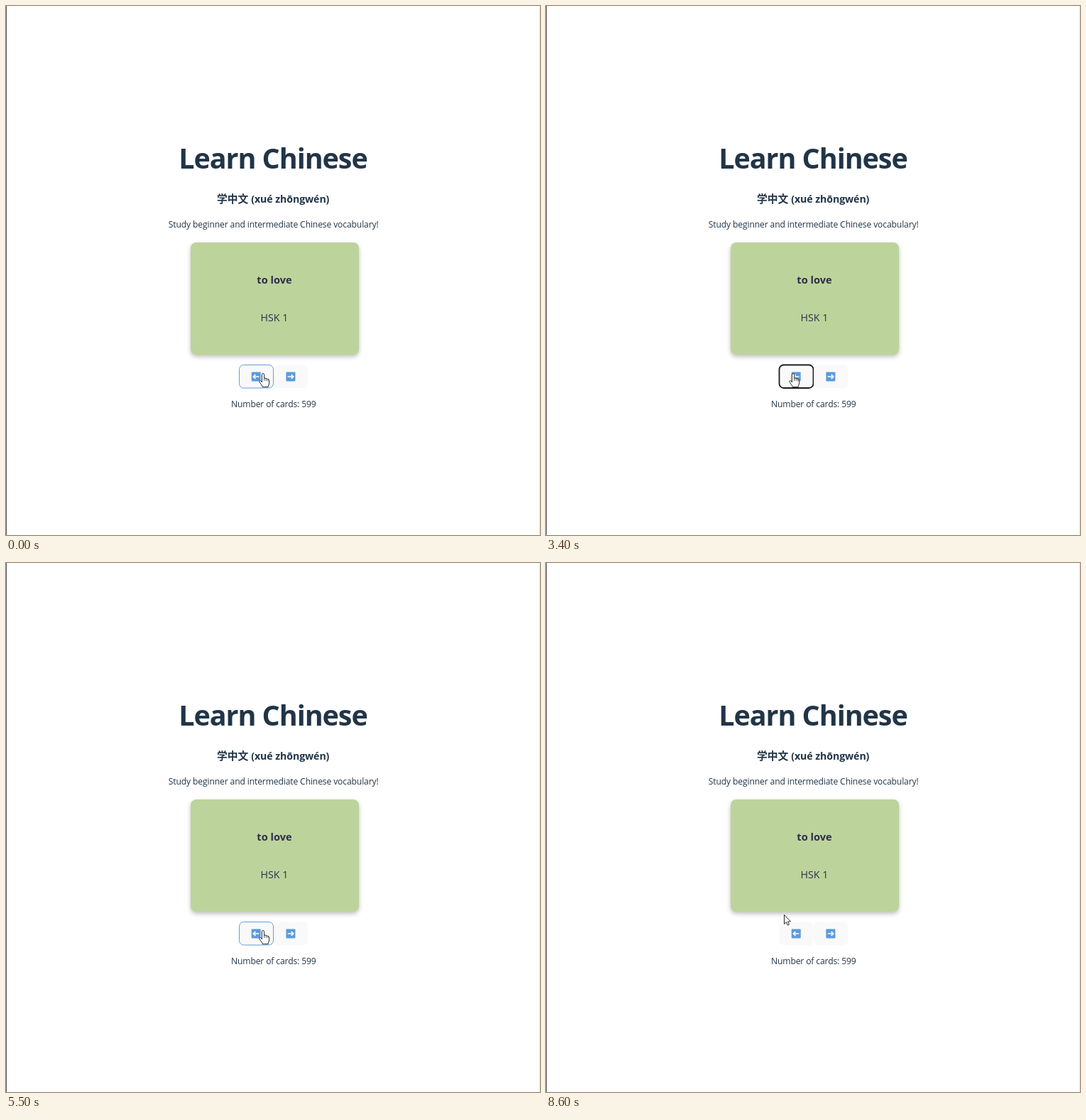
Recreate the animation shown at these times as an HTML page. Size 752 by 745 pixels, loop 8700 ms.

```html
<!DOCTYPE html>
<html lang="en">
<head>
<meta charset="utf-8">
<title>Learn Chinese</title>
<style>
html, body { margin: 0; width: 100%; height: 100%; overflow: hidden; background: #fff; }
body { position: relative; }
svg { position: absolute; left: 0; top: 0; display: block; overflow: visible; }
text { font-family: "Open Sans", "Noto Sans", sans-serif; fill: #213547; text-anchor: middle; }
.zh { font-family: "Noto Sans CJK SC", "Noto Sans CJK JP", "Noto Sans CJK", sans-serif; font-weight: 700; font-size: 14.8px; letter-spacing: 0; }
.small { font-size: 12.1px; letter-spacing: -.12px; }
#card { position: absolute; left: 259.5px; top: 333px; width: 237px; height: 158px; border-radius: 8px; box-shadow: 0 3px 6px rgba(0, 0, 0, .26); }
#card text { fill: #312d4b; }
</style>
</head>
<body>
<svg width="752" height="745" viewBox="0 0 752 745">
  <rect width="1" height="745" fill="#555"/>
  <rect x="751" width="1" height="745" fill="#e6e6e6"/>
  <text x="376" y="229.3" font-size="39.5" font-weight="700" letter-spacing="-1.05">Learn Chinese</text>
  <text x="297" y="277.3" style="text-anchor:start" class="zh" lang="zh-CN">学中文</text>
  <text x="345.3" y="277.3" style="text-anchor:start" font-size="14.2" font-weight="700" letter-spacing="-.1">(xué zhōngwén)</text>
  <text x="376.7" y="312.3" class="small">Study beginner and intermediate Chinese vocabulary!</text>
  <g id="buttons"></g>
  <text x="376.8" y="564.8" class="small">Number of cards: 599</text>
</svg>
<div id="card">
  <svg width="237" height="158" viewBox="0 0 237 158">
    <g id="front">
      <text id="word" x="118" y="58.3" font-size="14.6" font-weight="700"></text>
      <text id="level" x="118" y="111.3" font-size="14.2"></text>
    </g>
    <text id="back" x="118" y="85.2" font-size="14.4"><tspan id="hanzi" class="zh" lang="zh-CN"></tspan><tspan id="pinyin"></tspan></text>
  </svg>
</div>
<svg width="752" height="745" viewBox="0 0 752 745">
  <g id="hand" stroke="#2a2a2a" stroke-width="1" stroke-linejoin="round" stroke-linecap="round">
    <path fill="#fff" d="M-1.6 11.5V1.2a1.6 1.6 0 0 1 3.2 0V6.2q1.6-.6 2.7.6q1.5-.5 2.5.8q1.7-.1 1.8 1.8V13q0 2-1.4 4v1.6H-.9v-1.2Q-2.8 15.2-4.9 11.4c-.8-1.6.9-2.6 2-1.5z"/>
    <path fill="none" stroke-width=".8" d="M1.6 6.2V9.6M4.3 6.8V9.8M6.8 7.6V10"/>
  </g>
  <path id="arrow" fill="#fff" stroke="#2a2a2a" stroke-width="1" stroke-linejoin="round" d="M.5 .5V13.4L3.4 10.7L5.3 15.1L7.4 14.2L5.5 9.9H9.5Z"/>
</svg>
<script>
const LOOP = 8700, FLIP = 150, PRESS = 130;
const $ = id => document.getElementById(id);

const CARDS = {
  love: ['to love', 'HSK 1', '爱', 'ài', '#bcd49b'],
  eight: ['eight', 'HSK 1', '八', 'bā', '#bcd49b'],
  effect: ['effect', 'HSK 3', '作用', 'zuò yòng', '#f5c876']
};

// pointer tip: time, x, y
const PATH = [
  [0, 362, 518], [80, 362, 518], [350, 401, 521], [650, 401, 521],
  [1000, 372, 437], [1400, 371, 435], [2100, 371, 435], [2500, 350, 519],
  [3400, 348, 518], [3580, 348, 518], [3850, 373, 430], [4200, 373, 428],
  [4620, 373, 428], [4900, 402, 521], [5150, 402, 521], [5450, 362, 518],
  [5550, 362, 518], [5800, 401, 520], [6050, 401, 520], [6350, 372, 438],
  [6900, 372, 436], [7120, 372, 436], [7450, 344, 526], [8050, 344, 526],
  [8500, 335, 495], [LOOP, 335, 495]
];

// button release: time, button index, card shown afterwards
const CLICKS = [
  [500, 1, 'eight'], [2800, 0, 'love'], [3500, 0, 'effect'],
  [5050, 1, 'love'], [5950, 1, 'eight'], [7800, 0, 'love']
];

// card turned over: from, to
const TURNS = [[1200, 2000], [3950, 4500], [6450, 6950]];

const clamp = v => Math.max(0, Math.min(1, v));
const ease = v => { v = clamp(v); return v * v * (3 - 2 * v); };
const inside = ([x, y], l, t, w, h) => x >= l && x <= l + w && y >= t && y <= t + h;
const onCard = p => inside(p, 259.5, 332, 237, 158);
const onButton = (p, i) => inside(p, 328 + i * 49, 505, 48.5, 33);
const show = (el, on) => el.setAttribute('visibility', on ? 'visible' : 'hidden');

function pointer(t) {
  const i = Math.max(1, PATH.findIndex(k => k[0] >= t));
  const [t0, x0, y0] = PATH[i - 1], [t1, x1, y1] = PATH[i];
  const k = ease((t - t0) / (t1 - t0));
  return [x0 + (x1 - x0) * k, y0 + (y1 - y0) * k];
}

// share of the last FLIP ms spent over the card
function lift(t) {
  let n = 0;
  for (let i = 0; i < 10; i++) n += onCard(pointer(Math.max(0, t - i * FLIP / 10)));
  return ease(n / 10);
}

$('buttons').innerHTML = [0, 1].map(i => `
  <g transform="translate(${328 + i * 48.7} 505)">
    <rect class="btn" x=".5" y=".5" width="48" height="32.5" rx="6.3" fill="#f9f9f9"/>
    <g transform="translate(24.2 17)${i ? '' : ' scale(-1 1)'}">
      <rect x="-6.5" y="-6.5" width="13" height="13" rx="1" fill="#5b9bdc"/>
      <path d="M-4.2 0H3.6M.8 -2.9L3.8 0L.8 2.9" fill="none" stroke="#fff" stroke-width="1.7"/>
    </g>
  </g>`).join('');
const buttons = document.querySelectorAll('.btn');

function draw(t) {
  const p = pointer(t);
  const last = CLICKS.filter(c => c[0] <= t).pop();
  const [word, level, hanzi, pinyin, color] = CARDS[last ? last[2] : 'love'];
  $('word').textContent = word;
  $('level').textContent = level;
  $('hanzi').textContent = hanzi;
  $('pinyin').textContent = ` (${pinyin})`;

  const turn = TURNS.reduce((s, [a, b]) => s + ease((t - a) / FLIP) - ease((t - b) / FLIP), 0);
  const back = turn > .5;
  show($('front'), !back);
  show($('back'), back);
  const card = $('card').style;
  card.background = color;
  card.transform = `translateY(${-1.8 * lift(t)}px) perspective(790px) rotateY(${180 * (turn - back)}deg)`;

  buttons.forEach((b, i) => {
    const down = CLICKS.some(c => c[1] === i && t >= c[0] - PRESS && t < c[0]);
    const over = onButton(p, i);
    b.setAttribute('stroke', down ? '#1c1c1c' : over ? '#6a9bd0' : 'none');
    b.setAttribute('stroke-width', down ? 1.8 : 1);
  });

  const hot = onCard(p) || onButton(p, 0) || onButton(p, 1);
  show($('hand'), hot);
  show($('arrow'), !hot);
  for (const id of ['hand', 'arrow']) $(id).setAttribute('transform', `translate(${p[0]} ${p[1]})`);
}

const start = performance.now();
function tick() {
  draw((performance.now() - start) % LOOP);
  requestAnimationFrame(tick);
}
draw(0);
requestAnimationFrame(tick);
</script>
</body>
</html>
```
